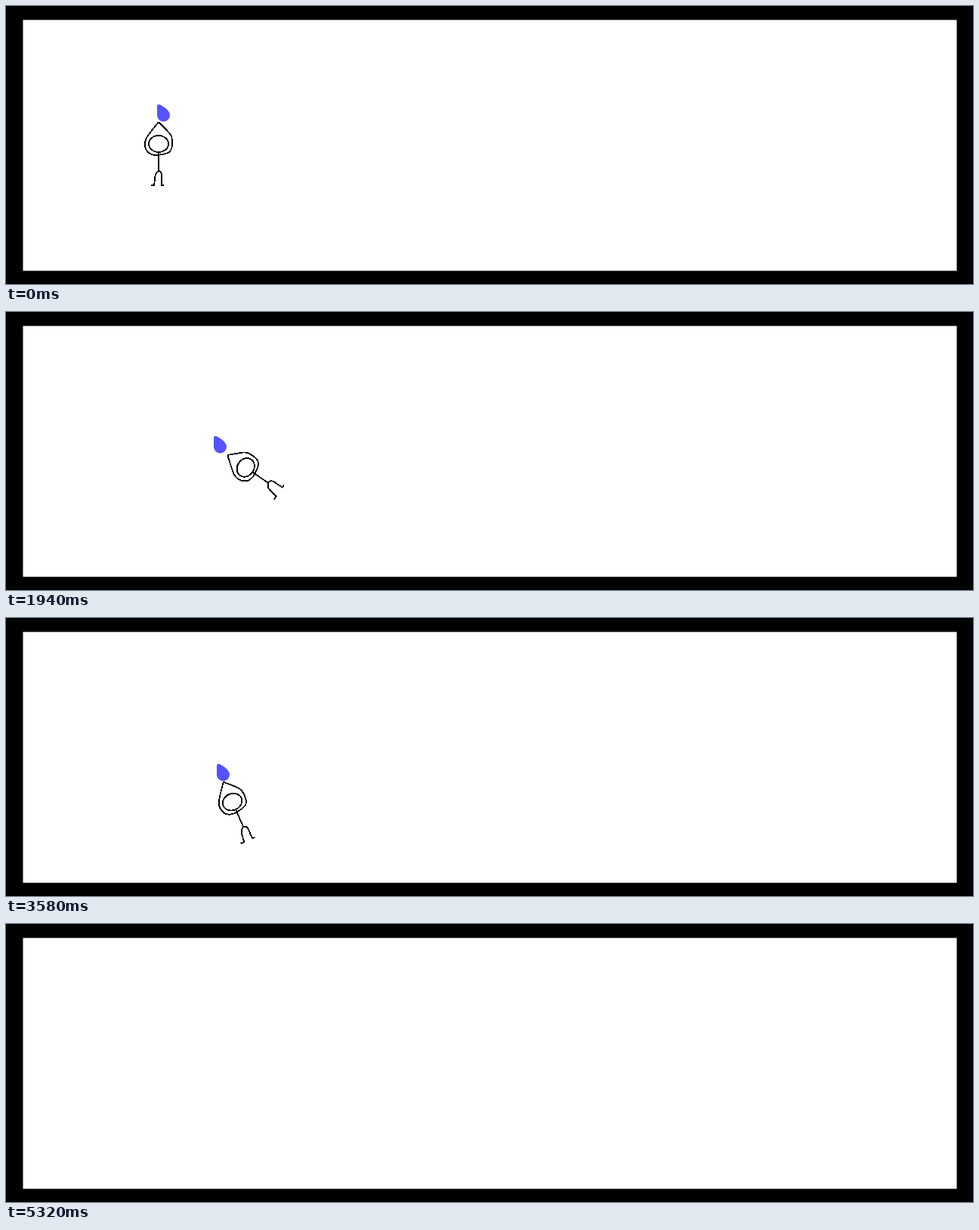
Animation, 1280 px wide and 369 px high, one loop 5.36 s. Source, as an HTML page:

```html
<!DOCTYPE html>
<html lang="en">
<head>
<meta charset="utf-8">
<title>Stick figure chasing a drop</title>
<style>
  html, body { margin: 0; width: 100%; height: 100%; overflow: hidden; background: #000; }
  svg { display: block; width: 100%; height: 100%; }
  #man { fill: none; stroke: #000; stroke-width: 1.8; shape-rendering: crispEdges; }
  #legs { vector-effect: non-scaling-stroke; }
</style>
</head>
<body>
<svg viewBox="0 0 1280 369">
  <rect x="22.5" y="18.5" width="1236" height="333" fill="#fff"/>
  <g id="actors">
    <!-- the origin of the figure is where its hands meet -->
    <g id="man">
      <path d="M0 0C-5 6-10 12-16 21C-20 29-18 37-13 41Q-9 44-3 44Q9 43 14 40Q19 36 18 24C18 16 12 13 0 0"/>
      <ellipse cy="29" rx="13" ry="11"/>
      <path d="M0 40V65"/>
      <path id="legs" d="M0 65Q-5 68-5 76L-6 84H-10M0 65Q4 65 4 72V84H7"/>
    </g>
    <path id="drop" fill="#5553fb" d="M-8-8Q-8-13-4-11Q9-4 9 3A8.5 8.5 0 0 1-8 3Z"/>
  </g>
</svg>
<script>
const LOOP = 5360, END = 5320, STEP = 20;
const ARM_LAG = 12, SWING_LAG = 60, SWING = 28;
const [actors, man, legs, drop] = ['actors', 'man', 'legs', 'drop']
  .map(id => document.getElementById(id));

// points on the drop's way: time, x, y
const keys = [
  [525, 208, 142], [1020, 875, 174], [1290, 1177, 130], [1600, 965, 137],
  [1940, 283, 176], [2145, 90, 181], [2680, 1170, 162], [2760, 1203, 148],
  [3580, 287, 205], [3655, 260, 208], [4220, 882, 196], [4490, 1114, 176],
  [4840, 859, 164], [END, 170, 181]
];
const last = keys.length - 1;

const rate = (i, c) => (keys[i + 1][c] - keys[i][c]) / (keys[i + 1][0] - keys[i][0]);

// harmonic mean of the neighbouring rates; zero at turning points
function slope(i, c) {
  if (i === 0 || i === last) return 0;
  const a = rate(i - 1, c), b = rate(i, c);
  return a * b > 0 ? 2 * a * b / (a + b) : 0;
}

function value(t, c) {
  if (t <= keys[0][0]) return keys[0][c];
  if (t >= END) return keys[last][c];
  const i = keys.findIndex(k => k[0] > t) - 1;
  const [p, q] = [keys[i], keys[i + 1]];
  const d = q[0] - p[0], u = (t - p[0]) / d, v = 1 - u;
  return v * v * (1 + 2 * u) * p[c] + u * u * (3 - 2 * u) * q[c]
    + d * u * v * (v * slope(i, c) - u * slope(i + 1, c));
}

const x = t => value(t, 1), y = t => value(t, 2);

function draw(now) {
  const t = Math.floor(now % LOOP / STEP) * STEP;
  actors.style.display = t < END ? '' : 'none';
  drop.setAttribute('transform', `translate(${x(t)} ${y(t)})`);

  // the hands trail the drop, the body swings with its recent speed
  const past = t - SWING_LAG;
  const tilt = SWING * (x(past + 10) - x(past - 10)) / 20;
  const pull = Math.abs(Math.sin(tilt * Math.PI / 180));
  const handX = x(t - ARM_LAG) - 6, handY = y(t - ARM_LAG) + 12 + 3 * pull;
  man.setAttribute('transform', `translate(${handX} ${handY}) rotate(${tilt})`);
  legs.setAttribute('transform', `scale(${1 + pull / 2} 1)`);
}

const start = performance.now();
function tick() {
  draw(performance.now() - start);
  requestAnimationFrame(tick);
}
tick();
</script>
</body>
</html>
```
